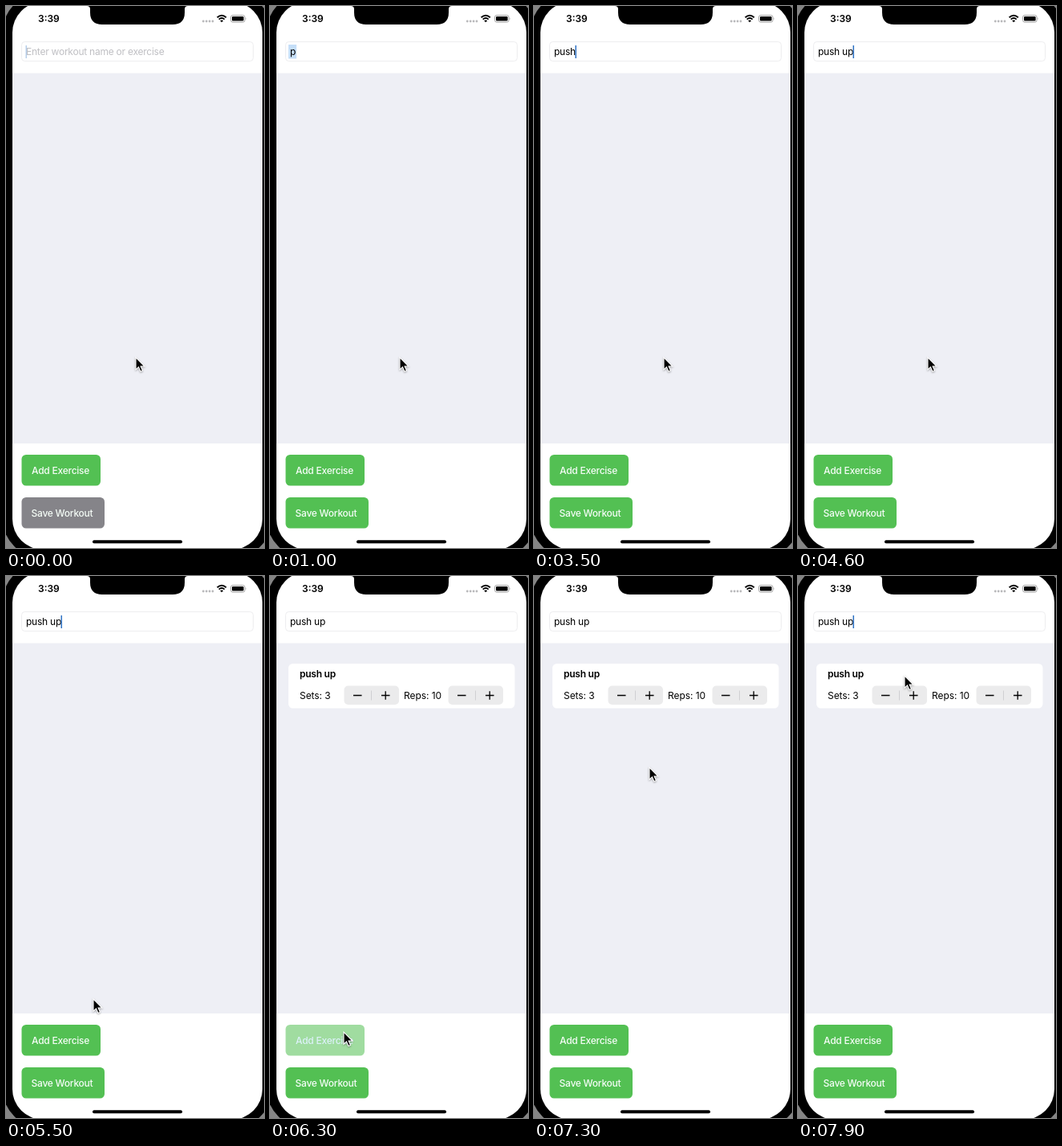
An HTML page that plays this animation: 322x674 px, repeating every 8 s.

```html
<!DOCTYPE html>
<html lang="en">
<head>
<meta charset="utf-8">
<title>Workout form</title>
<style>
  html, body { margin: 0; width: 100%; height: 100%; overflow: hidden; background: #000; }
  svg { display: block; width: 322px; height: 674px; }
  text { font: 400 12px Inter, "Liberation Sans", sans-serif; letter-spacing: -.02em; white-space: pre; }
  .label { font-weight: 500; fill: #f4fcf6; }
  .bold { font-weight: 600; }
  .loose { letter-spacing: -.005em; }
</style>
</head>
<body>
<svg viewBox="0 0 322 674">
  <defs>
    <g id="stepper">
      <rect width="68.5" height="23.5" rx="5" fill="#ebebec"/>
      <path d="M34 6v12" stroke="#cfcfd2"/>
      <path d="M11.5 12h10.5M46.5 12h10.5M51.7 6.8v10.4" stroke="#000" stroke-width="1.3"/>
    </g>
  </defs>

  <!-- Phone body and screen -->
  <rect width="322" height="674" fill="#858585"/>
  <rect x="-5" y="-17" width="338" height="704" rx="52"/>
  <rect x="8" y="-5" width="312" height="681" rx="38" fill="#fff"/>
  <path d="M101 0q4 0 4 4v4q0 15 15 15h88q15 0 15-15v-4q0-4 4-4z"/>
  <rect x="108" y="664.3" width="112" height="4" rx="2"/>

  <!-- Status bar -->
  <text class="bold" x="40" y="20.2" style="letter-spacing:0">3:39</text>
  <path d="M246.3 19h12.5" stroke="#b9b9bb" stroke-width="2.8" stroke-linecap="round" stroke-dasharray="0 3.9"/>
  <g fill="none" stroke="#000" stroke-width="1.9">
    <path d="M263.6 14.2q5.6-5 11.2 0M265.7 16.6q3.5-3 7 0"/>
  </g>
  <path d="M267.2 18.2q2-1.5 4 0l-2 2z"/>
  <rect x="280.5" y="11.5" width="17.6" height="8.6" rx="2.5" fill="none" stroke="#a5a5a5"/>
  <rect x="282" y="13" width="14.6" height="5.6" rx="1.3"/>
  <path d="M299.3 14.3q1.4 1.5 0 3z" fill="#a5a5a5"/>

  <!-- Name field -->
  <rect x="19.5" y="44.5" width="289" height="24" rx="4" fill="#fff" stroke="#ededef"/>
  <rect id="mark" x="23" y="48" height="17.5" fill="#c5def8"/>
  <text id="hint" x="25" y="61.2" fill="#bfbfc3">Enter workout name or exercise</text>
  <text id="typed" x="25" y="61.2"></text>
  <rect id="caret" y="49" width="1.5" height="16" fill="#2f72c4"/>

  <!-- Exercise list -->
  <rect x="8" y="83.5" width="312" height="460.5" fill="#eeeff5"/>
  <g id="card">
    <rect x="23" y="109" width="282.5" height="55.5" rx="5.5" fill="#fff"/>
    <text class="bold" x="37" y="126">push up</text>
    <text class="loose" x="37" y="153">Sets: 3</text>
    <text class="loose" x="167" y="153">Reps: 10</text>
    <use href="#stepper" x="92.5" y="136.5"/>
    <use href="#stepper" x="222.5" y="136.5"/>
  </g>

  <!-- Buttons -->
  <g id="add">
    <rect x="19.5" y="558" width="98.5" height="38.5" rx="5.5" fill="#53c053"/>
    <text class="label" x="32" y="581.7">Add Exercise</text>
  </g>
  <rect id="save" x="19.5" y="611" width="103.5" height="38.5" rx="5.5"/>
  <text class="label" x="31.5" y="634.7">Save Workout</text>

  <g id="cursor">
    <path d="M0 0v15.2l3.5-3.3 2.4 5.6 2.5-1.1-2.3-5.4h4.8z" fill="#000" stroke="#fff" stroke-width="1.1"
      style="filter:drop-shadow(0 1px 1px #0005)"/>
  </g>
</svg>
<script>
const LOOP = 8000;
const [mark, hint, typed, caret, card, add, save, cursor] =
  ["mark", "hint", "typed", "caret", "card", "add", "save", "cursor"].map(id => document.getElementById(id));

const keys = [[900, "p"], [1700, "pu"], [1950, "pus"], [2200, "push"], [2700, "push"],
  [3700, "push "], [4100, "push u"], [4500, "push up"]];
const COMMIT = 2700;
const path = [[5050, 162, 437], [5500, 109, 526], [5900, 92, 567], [6850, 92, 567],
  [7300, 144, 238], [7700, 140, 141], [7900, 133, 124]];

const clamp = v => Math.min(1, Math.max(0, v));
const ramp = (t, from, to) => clamp((t - from) / (to - from));
const ease = k => k * k * (3 - 2 * k);
const show = (el, on) => el.setAttribute("visibility", on ? "visible" : "hidden");

function cursorAt(t) {
  let [, x, y] = path[0];
  for (let i = 1; i < path.length; i++) {
    const [t0, x0, y0] = path[i - 1], [t1, x1, y1] = path[i];
    const k = ease(ramp(t, t0, t1));
    x += (x1 - x0) * k;
    y += (y1 - y0) * k;
  }
  return [x, y];
}

function caretAlpha(t, lastKey) {
  if (t < 900) return t < 200 ? .35 : t < 300 ? .6 : t < 400 ? .8 : 1;
  if (t < COMMIT) return 0; // composing text is marked instead
  if (t - lastKey < 450) return 1;
  const p = (t - 420 + LOOP) % 1000;
  return p < 900 ? 1 - ramp(p, 550, 700) : ramp(p, 900, 1000);
}

function draw(t) {
  const [lastKey, text] = keys.filter(k => k[0] <= t).pop() || [0, ""];
  if (typed.textContent !== text) typed.textContent = text;
  const width = text ? typed.getComputedTextLength() : 0;

  show(hint, !text);
  show(mark, text && t < COMMIT);
  mark.setAttribute("width", width + 3);
  caret.setAttribute("x", 24.5 + width);
  caret.setAttribute("opacity", caretAlpha(t, lastKey));

  save.setAttribute("fill", text ? "#53c053" : "#858489");
  show(card, t >= 6250);
  const press = ramp(t, 6000, 6150) - ease(ramp(t, 6320, 6570));
  add.setAttribute("opacity", 1 - .45 * press);
  add.lastElementChild.style.fill = press > .3 ? "#bfe6f2" : "";
  cursor.setAttribute("transform", `translate(${cursorAt(t)})`);
}

function tick() {
  draw(performance.now() % LOOP);
  requestAnimationFrame(tick);
}
tick();
</script>
</body>
</html>
```
